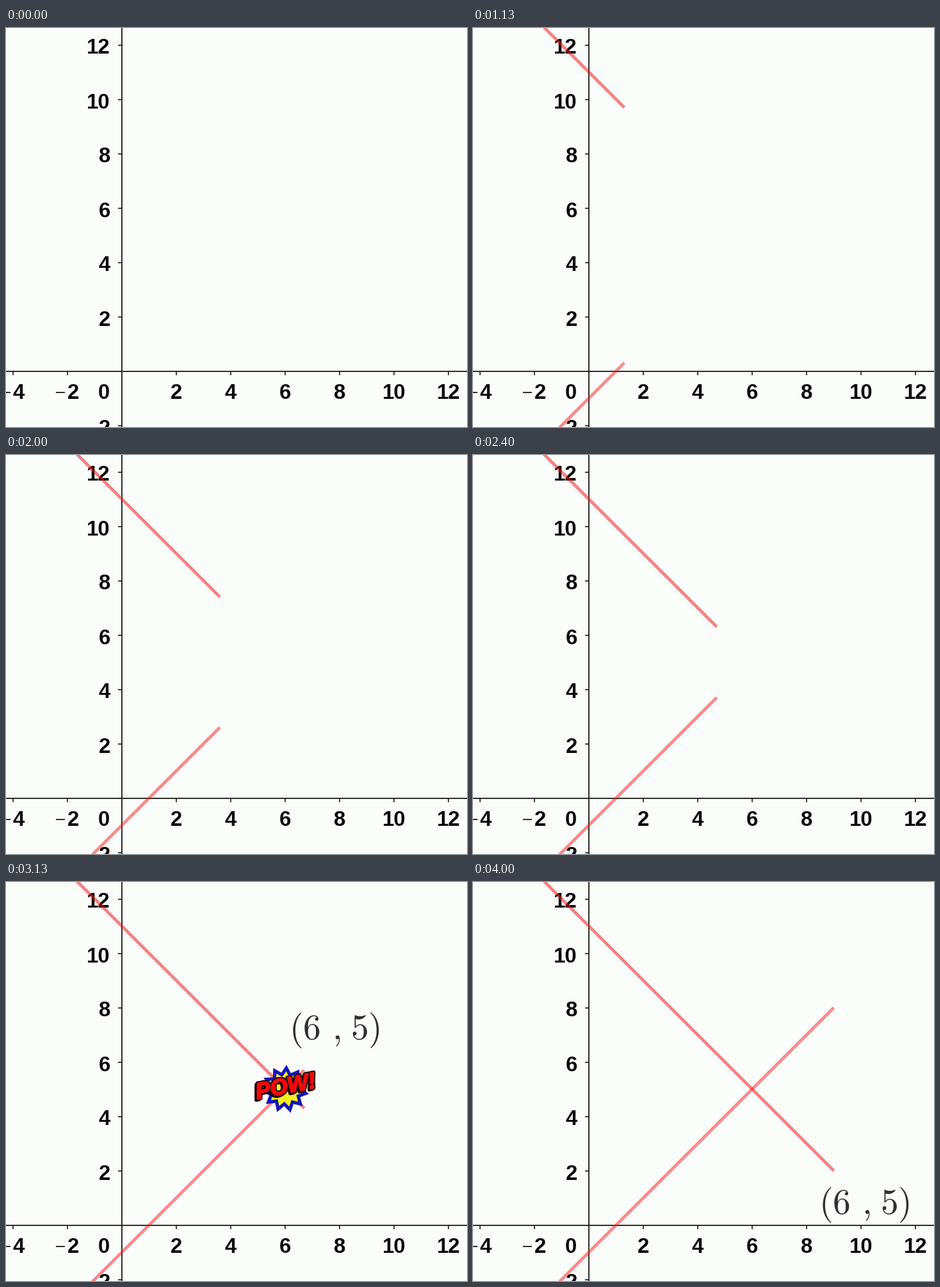
Animation of 720x624 px, one loop 5.59 s. Source, as a matplotlib script:

```python
import numpy as np
import matplotlib.pyplot as plt
from matplotlib.animation import FuncAnimation
from matplotlib.patches import Polygon
from matplotlib.patheffects import Normal, withStroke

W, H, DPI = 720, 624, 100
PT = 72 / DPI                      # points per pixel
UNIT, X0, Y0 = 42.5, 181, 536.5    # pixels per unit, origin
LOOP, INTERVAL = 5590, 26
STEPS = 60
CROSS = 6, 5                       # where the two lines meet
INK = "#141c10"

plt.rcParams["mathtext.fontset"] = "cm"
fig = plt.figure(figsize=(W / DPI, H / DPI), dpi=DPI, facecolor="#fbfdfb")
ax = fig.add_axes([0, 0, 1, 1])
ax.set_xlim(0, W)
ax.set_ylim(H, 0)
ax.axis("off")


def px(x):
    return X0 + UNIT * x


def py(y):
    return Y0 - UNIT * y


def stroke(xs, ys, width, color=INK, **style):
    return ax.plot(xs, ys, color=color, lw=width * PT,
                   solid_capstyle="butt", **style)[0]


def number(x, baseline, value, ha="center"):
    ax.text(x, baseline, str(value), ha=ha, va="baseline", color="#050805",
            family="Liberation Sans", weight="bold", size=33 * PT)


def draw_axes():
    stroke([0, W], [Y0 + 0.5] * 2, 1.8)
    stroke([X0] * 2, [0, H], 1.8)
    number(153, 579.5, 0)
    for v in (-4, -2, 2, 4, 6, 8, 10, 12):
        x, y = px(v), py(v)
        stroke([x, x], [Y0, Y0 + 6.5], 1.6)
        stroke([X0 - 6.5, X0], [y, y], 1.6)
        number(x + (9 if v < 0 else 0), 579.5, abs(v))
        number(163, y + 14, abs(v), ha="right")
        if v < 0:
            stroke([x - 18, x - 4], [569.5] * 2, 1.8)


def star(radius, color, spikes=11):
    angle = np.arange(2 * spikes) * np.pi / spikes + 0.2
    reach = radius * np.where(np.arange(2 * spikes) % 2, 0.7, 1)
    cx, cy = px(CROSS[0]), py(CROSS[1])
    points = np.column_stack([cx + reach * np.cos(angle),
                              cy + reach * np.sin(angle)])
    return ax.add_patch(Polygon(points, fc=color, ec="none", zorder=5))


def draw_pow():
    shadow = withStroke(linewidth=5 * PT, foreground="#180404",
                        offset=(-2 * PT, -2 * PT))
    outline = withStroke(linewidth=6 * PT, foreground="#180404")
    fatten = withStroke(linewidth=2 * PT, foreground="#f40808")
    word = ax.text(px(CROSS[0]) + 1, py(CROSS[1]) - 3, "POW!",
                   color="#f40808", family="Liberation Sans", weight="bold",
                   style="italic", size=35 * PT, rotation=11, zorder=6,
                   ha="center", va="center",
                   path_effects=[shadow, outline, fatten, Normal()])
    return [star(38, "#1414b8"), star(28, "#f8f020"), word]


draw_axes()
falling = stroke([], [], 4.8, "#f01414", alpha=0.53, zorder=4)
rising = stroke([], [], 4.8, "#f81818", alpha=0.5, zorder=4)
pow_parts = draw_pow()
label = ax.text(0, 0, r"$(6\hspace{0.37}{,}\;5)$", size=55.5 * PT,
                color="#303030", ha="left", va="baseline", zorder=8)


def update(i):
    step = min(STEPS, int((i * INTERVAL + 29) * STEPS / 4000))
    tip = round(-1.8 + 0.18 * step, 1)
    xs = [px(-3), px(tip)]
    falling.set_data(xs, [py(14), py(11 - tip)])
    rising.set_data(xs, [py(-4), py(tip - 1)])

    s = tip - CROSS[0]
    for part in pow_parts:
        part.set_visible(0 <= s <= 1)

    # the coordinates are thrown up from the crossing and fall
    label.set_visible(s >= 0)
    height = CROSS[1] + 3.83 * s - 1.79 * s * s
    label.set_position((px(tip) - 23.5, py(height) - 1))
    return [falling, rising, label, *pow_parts]


anim = FuncAnimation(fig, update, frames=LOOP // INTERVAL, interval=INTERVAL,
                     repeat=True, repeat_delay=0)
plt.show()
```
